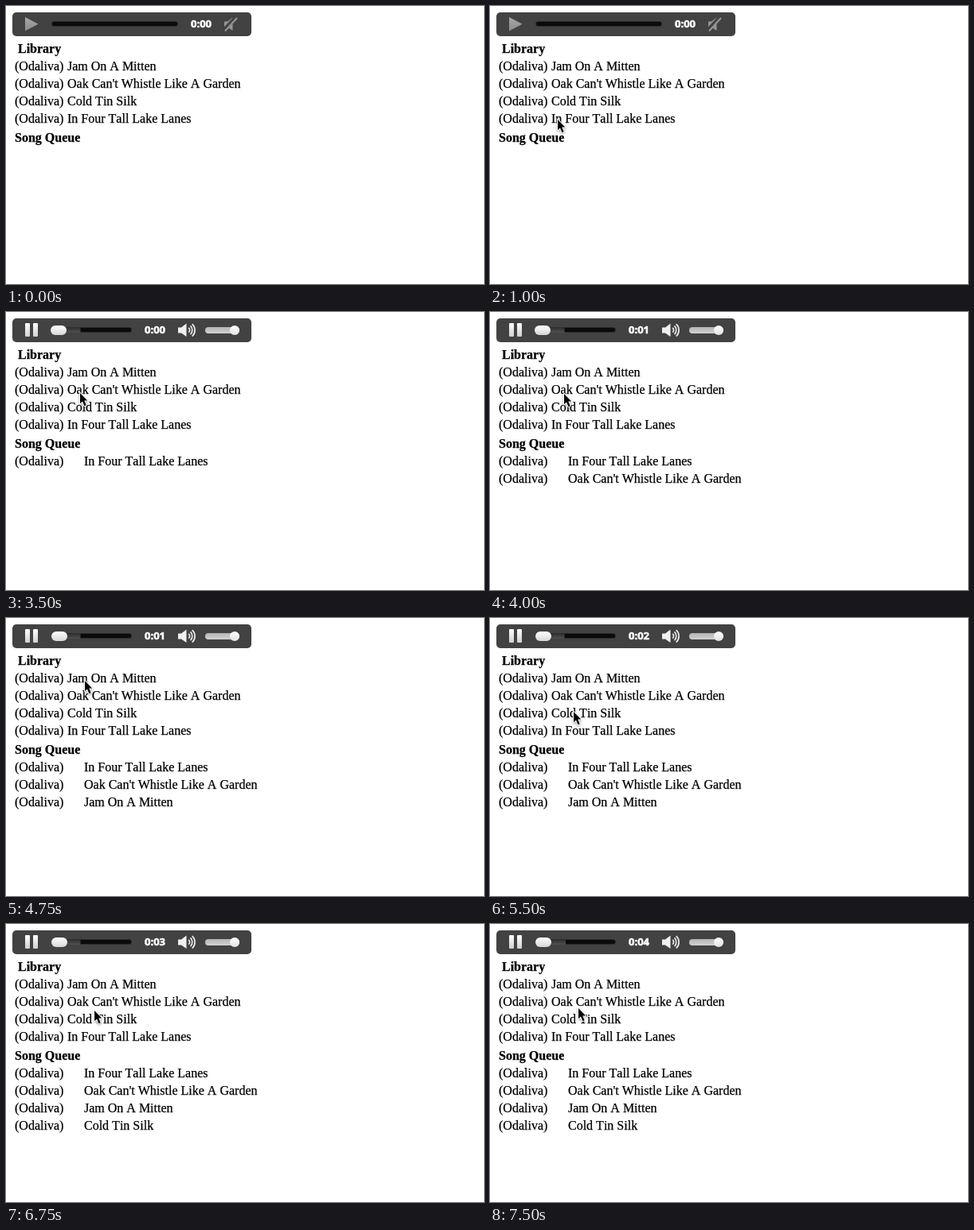
Animation of 600x350 px, one loop 8000 ms. Source, as an HTML page with a canvas:

```html
<!DOCTYPE html>
<html lang="en">
<head>
<meta charset="utf-8">
<title>Song queue</title>
<style>
  html, body { margin: 0; width: 100%; height: 100%; overflow: hidden; background: #fff; }
  canvas { display: block; }
</style>
</head>
<body>
<canvas id="stage" width="600" height="350"></canvas>
<script>
const ctx = document.getElementById('stage').getContext('2d');
const LOOP = 8000;
const PLAY_AT = 2500;
const SERIF = '16px "Liberation Serif", Times, serif';
const ARTIST = '(Odaliva)';
const SONGS = [
  'Jam On A Mitten',
  "Oak Can't Whistle Like A Garden",
  'Cold Tin Silk',
  'In Four Tall Lake Lanes'
];

// Song index and the moment it joins the queue
const QUEUE = [[3, 2500], [1, 3750], [0, 4750], [2, 6000]];
// Moments at which the elapsed seconds go up
const TICKS = [3750, 5000, 6000, 7000];
// Pointer: time, x, y
const POINTER = [
  [250, 458, 17], [500, 77, 160], [750, 73, 141], [1000, 85, 143],
  [3000, 93, 107], [3250, 92, 99], [3500, 93, 102], [4000, 93, 103],
  [4250, 99, 79], [5250, 103, 111], [5500, 105, 118],
  [6500, 107, 112], [6750, 111, 109], [7000, 111, 106]
];

// A hairline stroke gives the letters their slightly heavy smoothing
function text(str, x, y, font = SERIF, color = '#000', weight = 0.25) {
  ctx.font = font;
  ctx.fillStyle = ctx.strokeStyle = color;
  ctx.lineWidth = weight;
  ctx.fillText(str, x, y);
  ctx.strokeText(str, x, y);
}

function pill(x, y, w, h, r, fill) {
  ctx.beginPath();
  ctx.roundRect(x, y, w, h, r);
  ctx.fillStyle = fill;
  ctx.fill();
}

function shape(points, fill) {
  ctx.beginPath();
  points.forEach(([x, y]) => ctx.lineTo(x, y));
  ctx.closePath();
  ctx.fillStyle = fill;
  ctx.fill();
}

function line(x1, y1, x2, y2, width, color) {
  ctx.beginPath();
  ctx.moveTo(x1, y1);
  ctx.lineTo(x2, y2);
  ctx.lineWidth = width;
  ctx.strokeStyle = color;
  ctx.stroke();
}

function shade(y1, y2, top, bottom) {
  const g = ctx.createLinearGradient(0, y1, 0, y2);
  g.addColorStop(0, top);
  g.addColorStop(1, bottom);
  return g;
}

function track(x, right) {
  pill(x, 19, right - x, 7, 3.5, '#2c2c2c');
  pill(x + 1, 20, right - x - 2, 5, 2.5, '#0b0b0b');
}

function speaker(x, color) {
  shape([[x, 19.5], [x + 4, 19.5], [x + 10.5, 14.5], [x + 10.5, 31],
         [x + 4, 26.5], [x, 26.5]], color);
}

function idlePlayer() {
  shape([[24, 14], [40.5, 22.8], [24, 31.5]], shade(14, 31, '#a8a8a8', '#8c8c8c'));
  track(57, 216);
  speaker(274, '#969696');
  line(273, 31, 289, 14, 5, '#424242');
  line(275, 31.5, 290, 15, 2, '#969696');
}

function activePlayer(t) {
  const metal = shade(14, 31, '#ffffff', '#d0d0d0');
  pill(24, 14, 6, 17, 1, metal);
  pill(34, 14, 6, 17, 1, metal);

  track(57, 158);
  const loaded = t < 2750 ? 79 : t < 7500 ? 93.5 : 95;
  pill(57, 19, loaded - 57, 7, [3, 0, 0, 3], shade(19, 26, '#2c2c2c', '#505050'));
  pill(t < 4750 ? 56 : 57, 17, 20, 12, 6, shade(17, 29, '#fff', '#d6d6d6'));

  speaker(216, '#f0f0f0');
  ctx.strokeStyle = '#ececec';
  ctx.lineWidth = 1.7;
  for (const r of [4, 7.3, 10.6]) {
    ctx.beginPath();
    ctx.arc(226.5, 22.8, r, -0.82, 0.82);
    ctx.stroke();
  }

  pill(250, 19, 43, 8, 4, shade(19, 27, '#b4b4b4', '#d2d2d2'));
  pill(281, 17, 12, 12, 6, shade(17, 29, '#fff', '#e2e2e2'));
}

function player(t) {
  const playing = t >= PLAY_AT;
  pill(8, 8, 300, 30, 5, '#424242');
  if (playing) activePlayer(t); else idlePlayer();
  const seconds = TICKS.filter(at => t >= at).length;
  text('0:0' + seconds, playing ? 174 : 232, 27, 'bold 13px "Open Sans", sans-serif', '#fff', 0.6);
}

function lists(t) {
  text('Library', 15, 59, 'bold ' + SERIF);
  SONGS.forEach((song, i) => {
    text(ARTIST, 11, 81 + i * 22);
    text(song, 77, 81 + i * 22);
  });
  text('Song Queue', 11, 171, 'bold ' + SERIF);
  QUEUE.forEach(([song, at], i) => {
    if (t < at) return;
    text(ARTIST, 11, 193 + i * 22);
    text(SONGS[song], 98, 193 + i * 22);
  });
}

function pointer(t) {
  const step = POINTER.filter(([at]) => t >= at).pop();
  if (!step) return;
  const arrow = new Path2D('M0 0V13.2L3 10.4L5.4 16.2L7.7 15.2L5.3 9.6H9.2Z');
  ctx.save();
  ctx.translate(step[1], step[2]);
  ctx.lineWidth = 2;
  ctx.strokeStyle = '#fff';
  ctx.shadowColor = 'rgba(0,0,0,.4)';
  ctx.shadowBlur = 3;
  ctx.shadowOffsetY = 1;
  ctx.stroke(arrow);
  ctx.shadowColor = 'transparent';
  ctx.fillStyle = '#000';
  ctx.fill(arrow);
  ctx.restore();
}

function draw(now) {
  const t = now % LOOP;
  ctx.fillStyle = '#fff';
  ctx.fillRect(0, 0, 600, 350);
  player(t);
  lists(t);
  pointer(t);
}

ctx.fontKerning = 'none';
ctx.lineJoin = 'round';
const start = performance.now();
function tick() {
  draw(performance.now() - start);
  requestAnimationFrame(tick);
}
tick();
</script>
</body>
</html>
```
